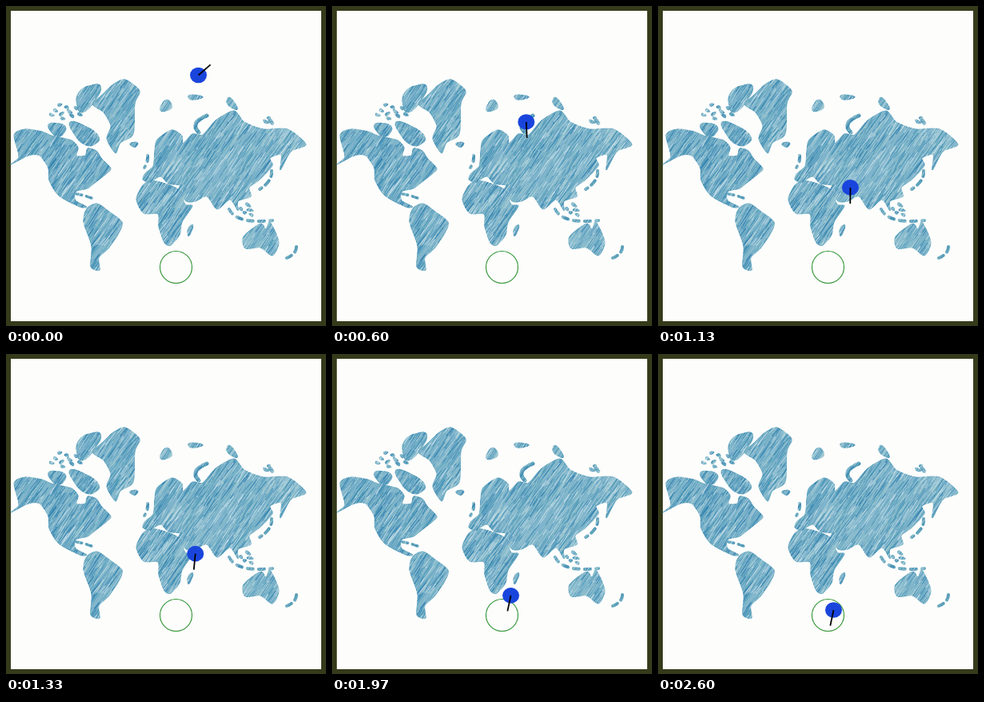
Recreate the animation shown at these times as an HTML page with a canvas. Size 400x400 px, loop 2.66 s.

```html
<!DOCTYPE html>
<html lang="en">
<head>
<meta charset="utf-8">
<title>Rover on a map</title>
<style>
html, body { margin: 0; width: 100%; height: 100%; overflow: hidden; background: #fdfdfc; }
canvas { display: block; width: 400px; height: 400px; }
</style>
</head>
<body>
<canvas id="stage" width="400" height="400"></canvas>
<script>
const ctx = document.getElementById('stage').getContext('2d');
const LOOP = 2660;
const LAST_STEP = 78;
const TAU = Math.PI * 2;

const newCanvas = () => Object.assign(document.createElement('canvas'), { width: 400, height: 400 });
const scene = newCanvas();
const map = newCanvas();
const pen = map.getContext('2d');

let seed = 4711;
const random = () => (seed = (seed * 16807) % 2147483647) / 2147483647;
const between = (low, high) => low + (high - low) * random();

// Smooth closed coast through a few points.
function land(outline) {
  const points = outline.split(' ').map(pair => pair.split(',').map(Number));
  const at = i => points[(i + points.length) % points.length];
  const tension = 0.13;
  pen.beginPath();
  pen.moveTo(...at(0));
  points.forEach(([x, y], i) => {
    const [px, py] = at(i - 1), [nx, ny] = at(i + 1), [fx, fy] = at(i + 2);
    pen.bezierCurveTo(
      x + (nx - px) * tension, y + (ny - py) * tension,
      nx - (fx - x) * tension, ny - (fy - y) * tension, nx, ny);
  });
  pen.fill();
  pen.stroke();
}

// Uneven ellipse for an island; the angle is in degrees.
function blob(x, y, rx, ry, angle = 0) {
  const phase = between(0, TAU);
  pen.save();
  pen.translate(x, y);
  pen.rotate(angle * Math.PI / 180);
  pen.beginPath();
  for (let a = 0; a < TAU; a += 0.2) {
    const r = 1 + 0.12 * Math.sin(3 * a + phase);
    pen.lineTo(rx * r * Math.cos(a), ry * r * Math.sin(a));
  }
  pen.closePath();
  pen.fill();
  pen.stroke();
  pen.restore();
}

// Curved row of islands; without a gap it is a single long one.
function chain(x1, y1, cx, cy, x2, y2, width, gap = 0) {
  pen.save();
  pen.lineWidth = width;
  pen.setLineDash(gap ? [7, gap] : []);
  pen.beginPath();
  pen.moveTo(x1, y1);
  pen.quadraticCurveTo(cx, cy, x2, y2);
  pen.stroke();
  pen.restore();
}

// Small islands spread evenly around a sunflower spiral.
function archipelago(x, y, rx, ry, count) {
  for (let i = 0; i < count; i++) {
    const r = Math.sqrt((i + 0.5) / count), a = i * 2.4;
    blob(x + rx * r * Math.cos(a), y + ry * r * Math.sin(a), between(2, 4), 1.6, between(-50, 50));
  }
}

function drawLands() {
  // North and South America
  land('10,161 24,154 45,157 57,162 82,168 90,177 88,187 99,187 102,178 113,181 119,190 131,203 124,211 111,221 102,228 87,232 87,243 101,251 92,251 66,237 54,218 53,203 42,187 28,187 6,198 16,188');
  land('101,253 114,247 129,257 145,270 141,284 128,303 116,315 117,330 106,326 107,300 97,270');
  chain(88, 235, 97, 236, 109, 241, 3.5, 6);

  // Arctic
  land('108,123 119,112 134,98 149,92 167,106 161,122 159,160 143,171 137,184 126,166 131,150 122,133');
  blob(102, 114, 20, 11, -52);
  blob(98, 160, 21, 10, 36);
  blob(64, 154, 11, 8, 20);
  archipelago(75, 132, 20, 11, 10);
  blob(160, 173, 5, 3);
  blob(200, 125, 8, 6, -45);
  blob(236, 114, 9, 3);
  chain(251, 137, 229, 146, 241, 158, 5);
  blob(282, 122, 9, 4, 50);
  archipelago(328, 143, 7, 4, 4);

  // Eurasia
  land('186,181 189,167 207,155 220,162 221,172 233,160 246,161 262,143 285,131 298,145 322,154 352,154 375,173 356,182 343,205 344,186 330,190 333,200 316,218 304,227 306,238 290,244 290,256 280,242 264,254 251,238 237,244 225,244 216,230 217,224 203,222 193,213 180,220 171,217 174,209 184,200');
  chain(177, 187, 178, 194, 173, 202, 4, 7);
  chain(332, 206, 333, 219, 317, 229, 4, 6);

  // Africa
  land('163,241 173,222 188,219 215,229 224,248 233,250 220,270 217,286 206,299 198,296 191,276 190,260 172,259');
  blob(230, 280, 7, 2.5, -70);

  // Australia and the islands around it
  land('297,288 318,272 325,279 330,270 341,295 333,312 318,302 299,303');
  chain(279, 254, 288, 273, 333, 268, 4, 7);
  archipelago(302, 255, 9, 9, 5);
  chain(363, 301, 363, 310, 351, 315, 4, 6);
}

// Pencil strokes, getting lighter towards the east.
function hatch() {
  const shades = ['#2f7fae', '#4090b4', '#5fa6c0', '#86bccb', '#a6cdd2', '#c8e1ea'];
  pen.globalCompositeOperation = 'source-atop';
  pen.globalAlpha = 0.85;
  for (let i = 0; i < 7000; i++) {
    const x = between(-10, 380), y = between(90, 360);
    const length = between(9, 30), angle = between(0.88, 1.04);
    const tone = random() ** (1.3 - x / 650);
    pen.lineWidth = between(0.5, 1.2);
    pen.strokeStyle = shades[Math.floor(tone * shades.length)];
    pen.beginPath();
    pen.moveTo(x, y);
    pen.lineTo(x + length * Math.cos(angle), y - length * Math.sin(angle));
    pen.stroke();
  }
}

function buildScene() {
  pen.fillStyle = '#7fb4cc';
  pen.strokeStyle = '#5a9fb8';
  pen.lineWidth = 1;
  pen.lineJoin = 'round';
  pen.lineCap = 'round';
  drawLands();
  hatch();

  const s = scene.getContext('2d');
  s.fillStyle = '#353b1a';
  s.fillRect(0, 0, 400, 400);
  s.fillStyle = '#fdfdfc';
  s.fillRect(6, 6, 388, 388);
  s.drawImage(map, 0, 0);
  s.strokeStyle = '#2f9433';
  s.lineWidth = 1.1;
  s.beginPath();
  s.arc(212.5, 326.5, 20, 0, TAU);
  s.stroke();
}

// Key points of the route: time, x, y
const route = [
  [0, 240.5, 86.5],
  [370, 243.5, 110],
  [830, 241.5, 184],
  [1130, 240.5, 226.5],
  [1570, 231.5, 273],
  [1970, 223.5, 302],
  [2600, 219.5, 320]
];

// The rover starts and ends at rest.
function velocity(i, axis) {
  const before = route[i - 1], after = route[i + 1];
  return before && after ? (after[axis] - before[axis]) / (after[0] - before[0]) : 0;
}

function position(t, axis) {
  const next = Math.max(1, route.findIndex(key => key[0] >= t));
  const a = route[next - 1], b = route[next];
  const span = b[0] - a[0], u = (t - a[0]) / span, v = 1 - u;
  return v * v * (1 + 2 * u) * a[axis] + u * u * (3 - 2 * u) * b[axis]
    + span * u * v * (v * velocity(next - 1, axis) - u * velocity(next, axis));
}

// A quick turn to the south, then a slow one towards the goal.
function heading(t) {
  const u = Math.min(1, Math.max(0, (t - 900) / 800));
  const degrees = 87.5 - 128.5 * Math.exp(-t / 85) + 14.5 * u * u * (3 - 2 * u);
  return degrees * Math.PI / 180;
}

function draw(now) {
  const tick = Math.floor((now % LOOP) / 10) * 10;
  const step = Math.min(LAST_STEP, Math.floor((tick + 3.4) * 0.03));
  const t = step * 100 / 3;
  const x = position(t, 1), y = position(t, 2), angle = heading(t);

  ctx.drawImage(scene, 0, 0);
  ctx.fillStyle = '#1a45dc';
  ctx.beginPath();
  ctx.ellipse(x, y, 10.5, 9.8, 0, 0, TAU);
  ctx.fill();
  ctx.strokeStyle = '#000';
  ctx.lineWidth = 1.8;
  ctx.beginPath();
  ctx.moveTo(x, y);
  ctx.lineTo(x + 20 * Math.cos(angle), y + 20 * Math.sin(angle));
  ctx.stroke();
}

buildScene();
const start = performance.now();
function frame() {
  draw(performance.now() - start);
  requestAnimationFrame(frame);
}
frame();
</script>
</body>
</html>
```
